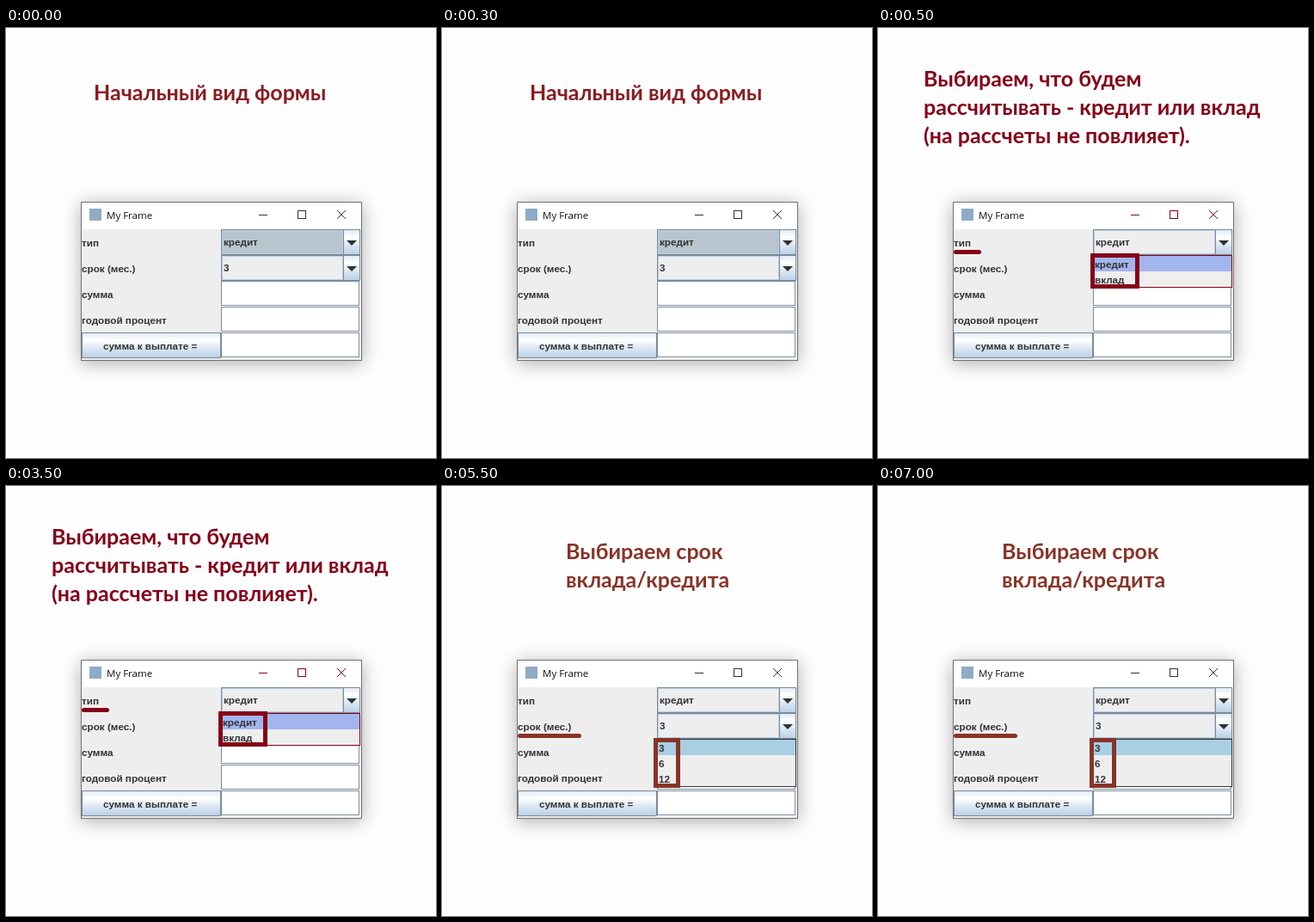
An HTML page with a canvas for the animation above (8 s loop, 500 px wide and 500 px high).

```html
<!DOCTYPE html>
<html lang="ru">
<head>
<meta charset="utf-8">
<style>
html, body { margin: 0; width: 100%; height: 100%; overflow: hidden; background: #fefefe; }
canvas { display: block; }
</style>
</head>
<body>
<canvas id="stage" width="500" height="500"></canvas>
<script>
const ctx = document.getElementById('stage').getContext('2d');
const LOOP = 8000;
const EDGE = '#7a8a99';
const GLOW = '#b8cfe5';
const INK = '#333333';
const PANEL = '#eeeeee';
const HEAD_FONT = 'bold 25px Lato, Carlito, sans-serif';
const FORM_FONT = 'bold 11.7px "Liberation Sans", Arial, sans-serif';
const TITLE_FONT = '11.5px "Open Sans", "Noto Sans", sans-serif';

const scenes = [
  {
    start: 0, color: '#8b1c1f', x: 102, y: 84,
    lines: ['Начальный вид формы'], typeFill: '#b8c5ce', icon: INK
  },
  {
    start: 500, color: '#850018', x: 53, y: 68,
    lines: ['Выбираем, что будем', 'рассчитывать - кредит или вклад', '(на рассчеты не повлияет).'],
    typeFill: PANEL, icon: '#850018',
    popup: { y: 264, items: ['кредит', 'вклад'], fill: '#a3b5ee', edge: '#850018' },
    mark: { x: 247, y: 262, w: 57, h: 41 },
    line: { from: 90.5, to: 117.5, y: 260.5 }
  },
  {
    start: 5500, color: '#883428', x: 144, y: 85,
    lines: ['Выбираем срок', 'вклада/кредита'], typeFill: PANEL, icon: INK,
    popup: { y: 294, items: ['3', '6', '12'], fill: '#a8cfe2', edge: INK },
    mark: { x: 246, y: 293, w: 31, h: 58 },
    line: { from: 90.5, to: 159.5, y: 290.5 }
  }
];

function rect(x, y, w, h, fill) {
  ctx.fillStyle = fill;
  ctx.fillRect(x, y, w, h);
}

function frame(x, y, w, h, color, width = 1) {
  ctx.strokeStyle = color;
  ctx.lineWidth = width;
  ctx.strokeRect(x + width / 2, y + width / 2, w - width, h - width);
}

function text(str, x, y, font = FORM_FONT, color = INK) {
  ctx.font = font;
  ctx.fillStyle = color;
  ctx.fillText(str, x, y);
}

function path(points, color, width = 1) {
  ctx.beginPath();
  points.forEach(([x, y], i) => i ? ctx.lineTo(x, y) : ctx.moveTo(x, y));
  ctx.strokeStyle = color;
  ctx.lineWidth = width;
  ctx.stroke();
}

// Glossy button face with a bright band near the top.
function gloss(x, y, w, h) {
  const g = ctx.createLinearGradient(0, y, 0, y + h);
  g.addColorStop(0, '#dde8f3');
  g.addColorStop(0.3, '#ffffff');
  g.addColorStop(0.6, '#dde8f3');
  g.addColorStop(1, GLOW);
  rect(x, y, w, h, g);
  frame(x, y, w, h, EDGE);
}

function combo(y, value, fill) {
  rect(250, y, 143, 30, fill);
  frame(250, y, 143, 30, EDGE);
  frame(251, y + 1, 141, 28, GLOW);
  gloss(392, y, 20, 30);
  ctx.fillStyle = INK;
  ctx.beginPath();
  ctx.moveTo(396, y + 13);
  ctx.lineTo(408, y + 13);
  ctx.lineTo(402, y + 19);
  ctx.fill();
  text(value, 253, y + 19);
}

function field(y) {
  rect(250, y, 162, 30, '#ffffff');
  frame(250, y, 161, 29, EDGE);
}

function titleBar(icon) {
  rect(88, 203, 325, 31, '#ffffff');
  rect(97, 210, 14, 14, '#8fabc6');
  text('My Frame', 117, 222, TITLE_FONT, '#111111');
  path([[294, 217.5], [304, 217.5]], icon);
  frame(339, 212, 10, 10, icon);
  path([[385, 212], [395, 222]], icon);
  path([[395, 212], [385, 222]], icon);
}

function form(scene) {
  ctx.save();
  ctx.shadowColor = 'rgba(0, 0, 0, 0.32)';
  ctx.shadowBlur = 20;
  ctx.shadowOffsetY = 3;
  rect(87, 202, 327, 185, '#737373');
  ctx.restore();
  rect(88, 203, 325, 183, PANEL);
  titleBar(scene.icon);
  ['тип', 'срок (мес.)', 'сумма', 'годовой процент']
    .forEach((label, i) => text(label, 88, 254 + i * 30));
  combo(234, 'кредит', scene.typeFill);
  combo(264, '3', PANEL);
  [294, 324, 354].forEach(field);
  gloss(88, 354, 162, 30);
  text('сумма к выплате =', 113, 374);
}

function popup({ y, items, fill, edge }) {
  const h = items.length * 18 + 2;
  rect(250, y, 162, h, PANEL);
  rect(251, y + 1, 160, 18, fill);
  frame(250, y, 162, h, edge);
  items.forEach((item, i) => text(item, 252, y + 15 + i * 18));
}

function draw(scene) {
  rect(0, 0, 500, 500, '#fefefe');
  scene.lines.forEach((s, i) => text(s, scene.x, scene.y + i * 33, HEAD_FONT, scene.color));
  form(scene);
  if (!scene.popup) return;
  popup(scene.popup);
  const { x, y, w, h } = scene.mark;
  frame(x, y, w, h, scene.color, 5);
  ctx.lineCap = 'round';
  path([[scene.line.from, scene.line.y], [scene.line.to, scene.line.y]], scene.color, 5);
  ctx.lineCap = 'butt';
}

const began = performance.now();

function tick() {
  const t = (performance.now() - began) % LOOP;
  draw(scenes.findLast(s => t >= s.start));
  requestAnimationFrame(tick);
}
tick();
</script>
</body>
</html>
```
